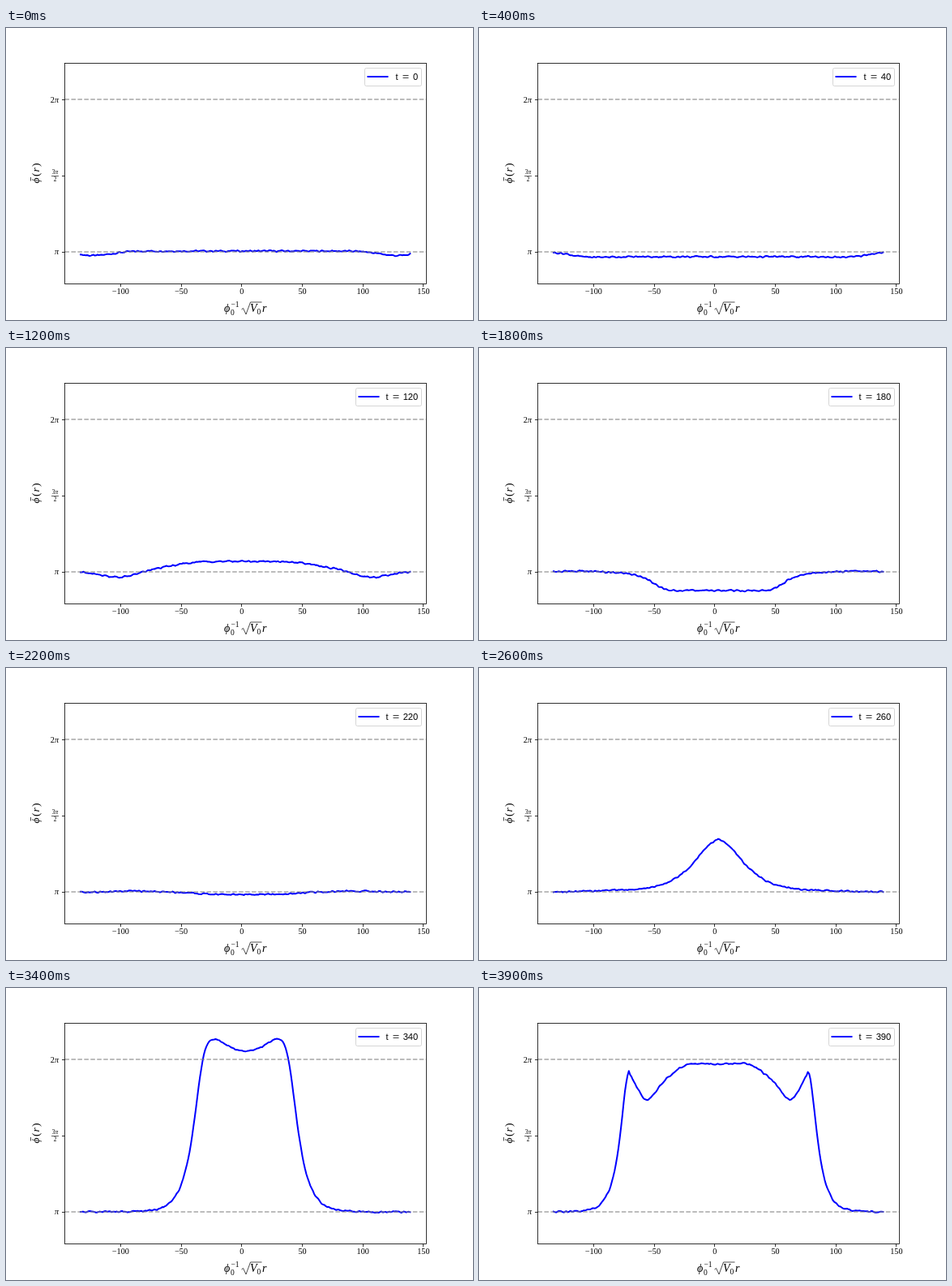
An HTML page for the animation above (4 s loop, 576 by 360 pixels).

```html
<!DOCTYPE html>
<html lang="en">
<head>
<meta charset="utf-8">
<style>
  html, body { margin: 0; width: 576px; height: 360px; overflow: hidden; background: #fff; }
  svg { display: block; font: 10.2px "Liberation Serif", "DejaVu Serif", serif; }
  .it { font-style: italic; }
  .sans { font: 11.2px "Liberation Sans", sans-serif; }
  .mid { text-anchor: middle; }
  .end { text-anchor: end; }
</style>
</head>
<body>
<svg width="576" height="360" viewBox="0 0 576 360">
  <path id="curve" fill="none" stroke="#00f" stroke-width="2" stroke-linejoin="round" stroke-linecap="square"/>
  <path d="M72.5 88H518M72.5 276H518" stroke="#808080" stroke-opacity=".7" stroke-width="1.5" stroke-dasharray="5.55 2.4"/>
  <rect x="72.5" y="43.5" width="446" height="272" fill="none" stroke="#000" stroke-width=".8"/>
  <path d="M72.5 88.5h-3.5M72.5 182.5h-3.5M72.5 276.5h-3.5" stroke="#000" stroke-width=".8"/>
  <g id="ticks"></g>

  <g class="end">
    <text x="65" y="92">2<tspan class="it">π</tspan></text>
    <text x="65" y="279" class="it">π</text>
  </g>
  <g class="mid" font-size="7.4">
    <text x="60.5" y="180">3<tspan class="it">π</tspan></text>
    <text x="60.5" y="189">2</text>
  </g>
  <path d="M56 182.5H65" stroke="#000" stroke-width=".6"/>

  <g class="it" font-size="14">
    <text x="269" y="350">ϕ</text>
    <text x="301" y="350">V</text>
    <text x="316" y="350">r</text>
  </g>
  <g font-size="9.5">
    <text x="277.5" y="344">−1</text>
    <text x="277" y="353.5">0</text>
    <text x="309.5" y="352.5">0</text>
  </g>
  <path d="M290.5 347l2-1.5 3.5 7.5 5.5-15H315.5" fill="none" stroke="#000" stroke-width=".7"/>

  <g transform="translate(41 191.5) rotate(-90)" font-size="13.5">
    <text class="it">ϕ</text>
    <text x="8.5">(</text>
    <text x="14" class="it">r</text>
    <text x="20.5">)</text>
    <path d="M3 -10.5H7.5" stroke="#000" stroke-width=".7"/>
  </g>

  <rect id="box" y="49.5" height="22" rx="2" fill="#fff" fill-opacity=".8" stroke="#ccc" stroke-opacity=".8"/>
  <path id="sample" stroke="#00f" stroke-width="2"/>
  <text id="equals" y="64.5" class="mid" font-size="15">=</text>
  <g class="sans">
    <text id="tee" y="64">t</text>
    <text id="value" x="508.3" y="64" class="end"></text>
  </g>
</svg>
<script>
const $ = id => document.getElementById(id);
const BASE = 276, CENTER = 295.5, LEFT = 92, RIGHT = 498.5, SPACING = 1.6;
const LIGHT = 1.494; // pixels per unit of r, and so per unit of t

for (let v = -100; v <= 150; v += 50) {
  const x = 290.8 + v * LIGHT, label = String(v).replace('-', '−');
  $('ticks').innerHTML += `<path d="M${Math.floor(x) + .5} 315.5v3.5" stroke="#000" stroke-width=".8"/>
    <text class="mid" x="${x}" y="328">${label}</text>`;
}

// Monotone cubic through (xs, ys), flat at both ends
function spline(xs, ys, x) {
  const slope = i => (ys[i + 1] - ys[i]) / (xs[i + 1] - xs[i]);
  const tangent = i => {
    if (i < 1 || i > xs.length - 2) return 0;
    const a = slope(i - 1), b = slope(i);
    return a * b > 0 ? 2 * a * b / (a + b) : 0;
  };
  let i = 0;
  while (i < xs.length - 2 && x > xs[i + 1]) i++;
  const w = xs[i + 1] - xs[i], u = Math.min(1, (x - xs[i]) / w), v = 1 - u;
  return v * v * (1 + 2 * u) * ys[i] + u * u * (3 - 2 * u) * ys[i + 1]
    + w * u * v * (v * tangent(i) - u * tangent(i + 1));
}

// Plateau of height 1 up to the radius, then a long exponential tail
const wall = (d, radius, width) => Math.cbrt(1 / (1 + Math.exp((d - radius) / width)));

// Growing oscillation that narrows, plus a ripple near the edges
function oscillation(t) {
  const swell = spline([0, 40, 80, 120, 192, 260, 300], [1, -6, 4.5, 13, -26, 69, 170], t);
  const phases = [0, 80, 120, 192, 260];
  const radius = spline(phases, [175, 175, 75, 72, 15], t);
  const width = spline(phases, [5, 5, 12, 5, 9], t);
  const ripple = spline([0, 80, 120, 170], [-5, 4, -8, 1], t);
  const crest = 155 + 30 * Math.cos(Math.PI * t / 80);
  return d => swell * wall(d, radius, width) + ripple * Math.exp(-(((d - crest) / 30) ** 2));
}

// Expanding bubble: the field inside rings with the proper time since its birth
function bubble(t) {
  const radius = 55.5 + 1.154 * (t - 340), width = 4.3 - .016 * (t - 340);
  return d => {
    const age = Math.sqrt(Math.max(0, (t - 310) ** 2 - (d / LIGHT) ** 2));
    const field = spline([0, 16, 30, 33, 44, 54, 68, 78, 90], [216, 214, 198, 183, 153, 138, 165, 183, 175], age);
    return field * wall(d, radius, width);
  };
}

function profile(t) {
  const before = oscillation(Math.min(t, 260)), after = bubble(Math.max(t, 320));
  const mix = spline([260, 320], [0, 1], Math.max(t, 260));
  return d => before(d) * (1 - mix) + after(d) * mix;
}

function random(i, seed) {
  const s = Math.sin(i * 12.9898 + seed * 78.233) * 43758.5453;
  return s - Math.floor(s) - .5;
}

function draw(step) {
  const t = step * 10, height = profile(t), points = [];
  for (let i = 0, x = LEFT; x <= RIGHT; x = LEFT + ++i * SPACING) {
    const noise = 1.2 * (random(i, step) + random(i + 1, step));
    points.push(`${x.toFixed(1)} ${(BASE - height(Math.abs(x - CENTER)) - noise).toFixed(2)}`);
  }
  $('curve').setAttribute('d', 'M' + points.join('L'));

  const digits = String(t).length, start = 508 - 6 * digits;
  const left = Math.floor(448.4 - 5.8 * digits) + .5;
  $('box').setAttribute('x', left);
  $('box').setAttribute('width', 512.5 - left);
  $('sample').setAttribute('d', `M${left + 3} 60H${left + 29}`);
  $('tee').setAttribute('x', start - 21.5);
  $('equals').setAttribute('x', start - 9);
  $('value').textContent = t;
}

let shown = -1;
function tick() {
  const step = Math.floor(performance.now() / 100) % 40;
  if (step !== shown) draw(shown = step);
  requestAnimationFrame(tick);
}
tick();
</script>
</body>
</html>
```
